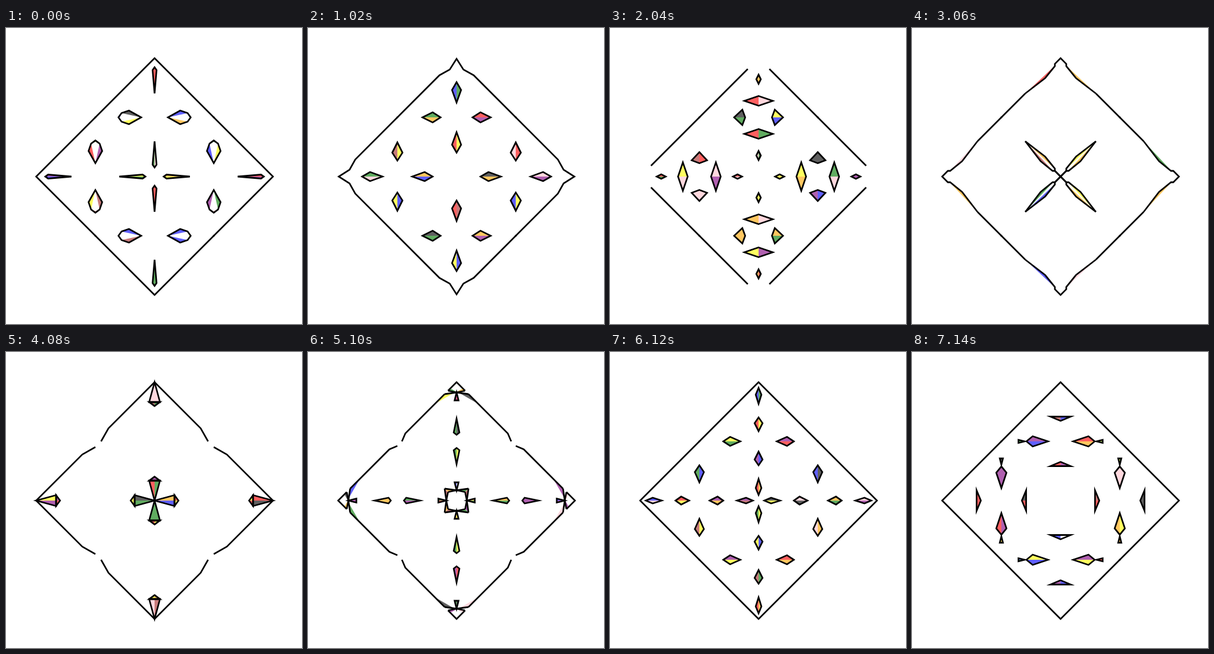
Animation, 520 px wide and 520 px high, one loop 8000 ms. Source, as an HTML page with a canvas:

```html
<!DOCTYPE html>
<html lang="en">
<head>
<meta charset="utf-8">
<title>Folded diamonds</title>
<style>
  html, body { margin: 0; width: 100%; height: 100%; overflow: hidden; background: #fff; }
  canvas { display: block; width: 520px; height: 520px; }
</style>
</head>
<body>
<canvas id="stage" width="520" height="520"></canvas>
<script>
const ctx = document.getElementById('stage').getContext('2d');
const LOOP = 8000, HOLD = 1020, CENTER = 261, CELL = 104;

const palette = {
  r: '#ff6060', o: '#ffc760', y: '#ffff60', g: '#60ac60', b: '#6060ff',
  p: '#b060b0', k: '#606060', n: '#c77a7a', i: '#ffd8de', w: '#ffffff'
};

// Points are (across, outward) from a cell centre. Colours run over the cells
// top, right, bottom, left; in each cell over its four quadrants, clockwise.
const quadrants = [[1, 1], [1, -1], [-1, -1], [-1, 1]];
const straightEdge = [[0, 104], [105, -1]];

const scenes = [
  {
    shapes: [
      [[[0, 88], [3.5, 83], [0, 42]], 'rigr pyor grrg pygb'],
      [[[23.5, 0], [45, 12], [58, 7.5], [63.5, 0]]]
    ],
    fills: [
      [[[23.5, 0], [45, 12], [58, 7.5]], 'boyk gpby nbbb rpny'],
      [[[58, 7.5], [63.5, 0], [61, 0]], 'bywb rwgg wwyy gorr']
    ],
    edges: [straightEdge]
  },
  {
    shapes: [
      [[[0, 62], [8, 48], [0, 26]], 'gyrb poki yrnb gobi'],
      [[[28, 0], [42, 9], [60, 0]], 'rpog ybir gkop nyby']
    ],
    edges: [[[0, 103], [12, 84], [30, 74], [105, -1]]]
  },
  {
    shapes: [
      [[[0, 75], [4, 67], [0, 59]], 'ogio pyyp oyyr rrig'],
      [[[0, 37.5], [25, 29], [0, 20.5]], 'igrr ioyg yoip yipi'],
      [[[23.5, 0], [28.5, 13.5], [43, 0]], 'ybgk bpkk ooog nrii']
    ],
    edges: [[[19, 85], [105, -1]]]
  },
  {
    fills: [[[[62, 42], [27, 69], [14, 87]], 'oyor oyog bboi ingo']],
    lines: [[[0, 104], [10, 94], [10, 90], [27, 69], [62, 42]]],
    edges: [[[62, 42], [105, -1]]]
  },
  {
    shapes: [
      [[[0, 104], [9.5, 69], [0, 69]], 'igri kbor iggn ykgp'],
      [[[0, 69], [9.5, 69], [0, 62]], 'gppn ryry yryo pyyr']
    ],
    edges: [[[0, 104], [81, 23], [94, 0]]]
  },
  {
    shapes: [
      [[[0, 86], [3.5, 72], [0, 72]], 'rwbp pgob goyk pgrp'],
      [[[0, 40], [5, 15.5], [0, 11.5]], 'kygg pgop pgyr ogpo']
    ],
    fills: [
      [[[5, 85], [21, 83], [38, 66]], 'k..y i..p k..i b..g'],
      [[[0, 87], [15, 89], [11, 93]], 'o..g p..i p..i k..o'],
      [[[0, 86], [15, 89], [21, 83]], '.go. .pn. .ng. .no.']
    ],
    lines: [[[0, 86], [15, 89]], [[0, 86], [21, 83]]],
    edges: [[[0, 104], [15, 89]], [[21, 83], [90, 14], [96, 0]]]
  },
  {
    shapes: [
      [[[0, 94], [5, 82], [0, 66]], 'gorb pyki rgyo bpni'],
      [[[0, 42], [7, 32], [0, 18]], 'ybpr gkio nybg rpoy'],
      [[[32, 0], [50, 8], [62, 0]], 'prgy oibk ypro gbyn']
    ],
    edges: [straightEdge]
  },
  {
    shapes: [
      [[[0, 43.5], [18, 43.5], [0, 36]], 'bprn krnk pbwb rkrr'],
      [[[22, 0], [49, 9], [60, 0]], 'robp yoii bypy pppr'],
      [[[63, 0], [74, 2.8], [74, 0]], 'yggg ooyg gbrr kkoy']
    ],
    edges: [straightEdge]
  }
];

function trace(points, su, sv) {
  ctx.beginPath();
  for (const [u, v] of points) ctx.lineTo(u * su, -v * sv);
}

function fillQuadrants(points, colors) {
  quadrants.forEach(([su, sv], q) => {
    const color = palette[colors[q]];
    if (!color) return;
    ctx.fillStyle = color;
    trace(points, su, sv);
    ctx.fill();
  });
}

// A path that starts on an axis is joined there to its mirror image.
function strokeMirrored(points, { closed = false, outer = false } = {}) {
  const [u0, v0] = points[0];
  const onV = u0 === 0, onU = v0 === 0;
  const mirror = ([u, v]) => onV ? [-u, v] : [u, -v];
  const path = onV || onU
    ? [...points.slice(1).reverse().map(mirror), ...points]
    : points;
  for (const su of onV ? [1] : [1, -1]) {
    for (const sv of outer || onU ? [1] : [1, -1]) {
      trace(path, su, sv);
      if (closed) ctx.closePath();
      ctx.stroke();
    }
  }
}

function eachCell(draw) {
  for (let cell = 0; cell < 4; cell++) {
    ctx.save();
    ctx.translate(CENTER, CENTER);
    ctx.rotate(cell * Math.PI / 2);
    ctx.translate(0, -CELL);
    draw(cell);
    ctx.restore();
  }
}

function drawScene({ shapes = [], fills = [], lines = [], edges = [] }) {
  ctx.fillStyle = '#fff';
  ctx.fillRect(0, 0, 520, 520);
  ctx.strokeStyle = '#000';
  ctx.lineWidth = 2.8;
  ctx.lineJoin = 'miter';
  ctx.miterLimit = 10;
  eachCell(cell => {
    for (const [points, colors] of [...fills, ...shapes]) {
      if (colors) fillQuadrants(points, colors.split(' ')[cell]);
    }
  });
  eachCell(() => {
    for (const [points] of shapes) strokeMirrored(points, { closed: true });
    for (const points of lines) strokeMirrored(points);
    for (const points of edges) strokeMirrored(points, { outer: true });
  });
}

const start = performance.now();
let shown = -1;

function tick() {
  const index = Math.floor((performance.now() - start) % LOOP / HOLD);
  if (index !== shown) {
    drawScene(scenes[index]);
    shown = index;
  }
  requestAnimationFrame(tick);
}
tick();
</script>
</body>
</html>
```
